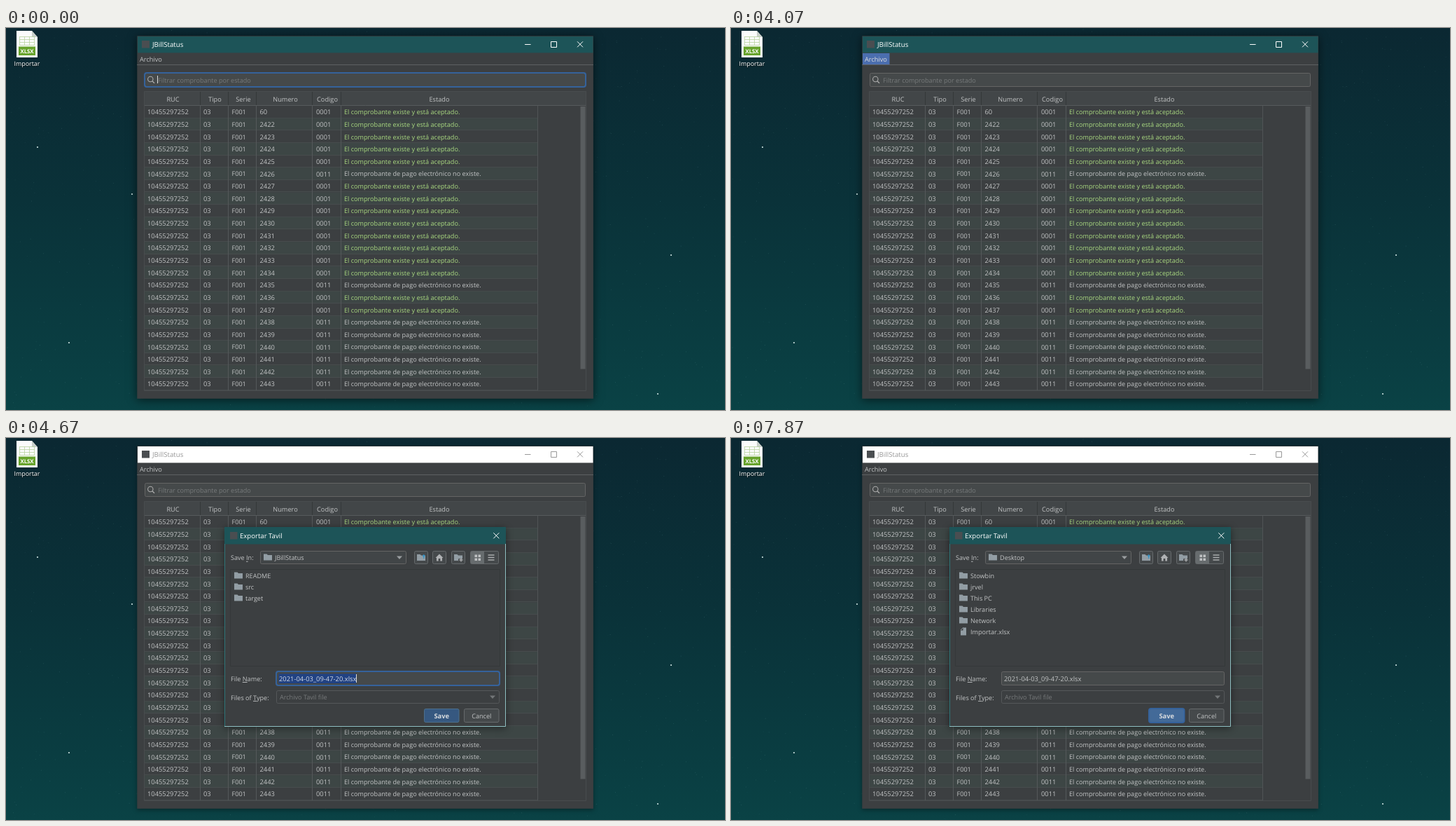
An HTML page with a canvas that plays this animation: 1027x545 px, repeating every 8000 ms.

```html
<!DOCTYPE html>
<html lang="es">
<head>
<meta charset="utf-8">
<title>JBillStatus</title>
<style>
  html, body { margin: 0; width: 100%; height: 100%; overflow: hidden; background: #0a3238; }
  canvas { display: block; width: 1027px; height: 545px; }
</style>
</head>
<body>
<canvas id="stage" width="1027" height="545"></canvas>
<script>
const W = 1027, H = 545, LOOP = 8000;
const stage = document.getElementById('stage').getContext('2d');
let ctx = stage;

const C = {
  panel: '#3c3f41', field: '#45494a', border: '#646464', text: '#c2c4c5', dim: '#777a7b',
  green: '#a9d980', teal: '#1d5458', ring: '#35629b', focus: '#4a7ab0', button: '#45494b',
  buttonEdge: '#666a6c', icon: '#929da4', menu: '#4b6eaf', appIcon: '#4a4e51', listEdge: '#343839'
};

// ---------- helpers ----------
function newLayer(paint) {
  const layer = document.createElement('canvas');
  layer.width = W;
  layer.height = H;
  const previous = ctx;
  ctx = layer.getContext('2d');
  paint();
  ctx = previous;
  return layer;
}

function rect(x, y, w, h, fill) {
  ctx.fillStyle = fill;
  ctx.fillRect(x, y, w, h);
}

function box(x, y, w, h, fill, stroke, r = 2, lineWidth = 1) {
  ctx.beginPath();
  ctx.roundRect(x + lineWidth / 2, y + lineWidth / 2, w - lineWidth, h - lineWidth, r);
  if (fill) { ctx.fillStyle = fill; ctx.fill(); }
  if (stroke) { ctx.strokeStyle = stroke; ctx.lineWidth = lineWidth; ctx.stroke(); }
}

function path(points, color, width = 1) {
  ctx.beginPath();
  points.forEach(([x, y], i) => i ? ctx.lineTo(x, y) : ctx.moveTo(x, y));
  ctx.strokeStyle = color;
  ctx.lineWidth = width;
  ctx.stroke();
}

function shape(points, fill) {
  ctx.beginPath();
  points.forEach(([x, y]) => ctx.lineTo(x, y));
  ctx.closePath();
  ctx.fillStyle = fill;
  ctx.fill();
}

function text(value, x, midY, color = C.text, size = 9.1, align = 'left', weight = 400) {
  ctx.font = `${weight} ${size}px "Open Sans", "Noto Sans", sans-serif`;
  ctx.textRendering = 'geometricPrecision';
  ctx.textAlign = align;
  ctx.fillStyle = color;
  ctx.fillText(value, x, midY + size * 0.36);
}

// Label with one underlined mnemonic letter.
function mnemonic(value, index, x, midY) {
  text(value, x, midY);
  const start = ctx.measureText(value.slice(0, index)).width;
  const width = ctx.measureText(value[index]).width;
  rect(x + start, midY + 4.6, width, 0.9, C.text);
}

function focusRing(x, y, w, h) {
  box(x - 1, y - 1, w + 2, h + 2, null, C.ring, 3, 2);
}

function cross(x, y, r, color) {
  path([[x - r, y - r], [x + r, y + r]], color);
  path([[x + r, y - r], [x - r, y + r]], color);
}

function arrow(x, y, color) {
  shape([[x - 4, y - 2], [x + 4, y - 2], [x, y + 2.5]], color);
}

function folder(x, y) {
  shape([[x, y - 5], [x + 4.5, y - 5], [x + 6, y - 3.5], [x + 12, y - 3.5],
         [x + 12, y + 4], [x, y + 4]], C.icon);
}

// ---------- desktop ----------
function paintDesktop() {
  const sky = ctx.createLinearGradient(0, 0, 0, H);
  sky.addColorStop(0, '#0b2832');
  sky.addColorStop(0.45, '#0a3239');
  sky.addColorStop(1, '#0a4245');
  rect(0, 0, W, H, sky);

  let seed = 7;
  const random = () => (seed = seed * 16807 % 2147483647) / 2147483647;
  for (let i = 0; i < 800; i++) {
    rect(random() * W, random() * H, 1, 1, `rgba(150,200,200,${0.04 + random() * 0.13})`);
  }
  for (const [x, y] of [[45, 170], [180, 237], [90, 449], [950, 324], [931, 522]]) {
    ctx.beginPath();
    ctx.arc(x, y, 1.1, 0, 7);
    ctx.fillStyle = '#cfe4e2';
    ctx.fill();
  }

  shape([[15, 4], [37, 4], [45, 13], [45, 42], [15, 42]], '#fbfbfb');
  shape([[37, 4], [45, 13], [37, 13]], '#c9cfc9');
  for (let i = 0; i < 4; i++) {
    path([[19, 12.5 + i * 4], [41, 12.5 + i * 4]], '#b9d3a0', 0.8);
    path([[19.5 + i * 7, 12.5], [19.5 + i * 7, 24.5]], '#b9d3a0', 0.8);
  }
  rect(18, 26.5, 24, 12.5, '#68a32c');
  text('XLSX', 30, 33, '#ffffff', 7.8, 'center', 700);
  ctx.shadowColor = '#000';
  ctx.shadowBlur = 2;
  ctx.shadowOffsetY = 1;
  text('Importar', 30, 51, '#ffffff', 8.9, 'center');
}

// ---------- main window ----------
const columnEdges = [277.5, 317.5, 357.5, 437.5, 478.5];
const headers = [['RUC', 238.5], ['Tipo', 298.5], ['Serie', 339], ['Numero', 399], ['Codigo', 459], ['Estado', 619]];
const ROWS = 23, ROW_H = 17.64, TOP = 111;

function paintTable() {
  rect(198, 90, 631, 21, '#424648');
  for (const [name, x] of headers) text(name, x, 101.6, C.text, 9.2, 'center');

  for (let i = 0; i < ROWS; i++) {
    const y = TOP + i * ROW_H, mid = y + 9;
    if (i % 2) rect(198, y, 561, ROW_H, '#3d4645');
    rect(198, Math.round(y + ROW_H) - 1, 561, 1, '#474c4d');
    const missing = i === 5 || i === 14 || i > 16;
    text('10455297252', 202, mid, C.text, 9.35);
    text('03', 282, mid, C.text, 9.35);
    text('F001', 322.5, mid);
    text(String(i ? 2421 + i : 60), 362.5, mid, C.text, 9.35);
    text(missing ? '0011' : '0001', 443, mid, C.text, 9.35);
    text(missing ? 'El comprobante de pago electrónico no existe.' : 'El comprobante existe y está aceptado.',
         483, mid, missing ? C.text : C.green);
  }

  for (const x of columnEdges) {
    path([[x, 90], [x, 110]], C.listEdge);
    path([[x, 111], [x, 517]], '#54585a');
  }
  path([[759.5, 111], [759.5, 517]], '#505456');
  path([[198, 110.5], [829, 110.5]], '#565a5c');
  box(197, 90, 632, 428, null, '#484c4e', 0);
  rect(820.5, 112, 7, 374.5, '#595d5f');
}

function paintWindow({ active, focused }) {
  ctx.save();
  ctx.shadowColor = active ? 'rgba(0,0,0,.55)' : 'rgba(0,0,0,.35)';
  ctx.shadowBlur = active ? 12 : 6;
  ctx.shadowOffsetY = 2;
  rect(187.3, 11.3, 651.6, 517.5, C.panel);
  ctx.restore();

  const ink = active ? '#ffffff' : '#999999';
  rect(188, 12, 650.5, 23.4, active ? C.teal : '#ffffff');
  rect(194, 18, 11, 10.5, C.appIcon);
  text('JBillStatus', 209, 23.6, ink, 9.7);
  path([[741, 23.5], [749.5, 23.5]], ink);
  box(778, 19, 9, 9, null, ink, 0);
  cross(820, 23.3, 4, ink);

  rect(187, 52, 652, 1, '#5d6062');
  box(198, 64, 630, 20, C.field, focused ? C.focus : C.border);
  if (focused) focusRing(198, 64, 630, 20);
  ctx.beginPath();
  ctx.arc(206.3, 73, 3.7, 0, 7);
  ctx.strokeStyle = '#adadad';
  ctx.lineWidth = 1.1;
  ctx.stroke();
  path([[209, 75.7], [212, 78.7]], '#adadad', 1.3);
  text('Filtrar comprobante por estado', 217, 74.6, C.dim);
  paintTable();
}

function paintMenu(highlight) {
  if (highlight) rect(188, 36, 38.5, 16, C.menu);
  text('Archivo', 191, 44.4, highlight ? '#dddddd' : C.text, 9.2);
}

function paintPopup(hovered) {
  box(188, 52, 110, 52, C.panel, '#5d6062', 0);
  ['Importar Tavil', 'Exportar Tavil', 'Salir'].forEach((item, i) => {
    const y = 53 + i * 16.7;
    if (i === hovered) rect(189, y, 108, 16.7, C.menu);
    text(item, 206, y + 8.4, i === hovered ? '#dddddd' : C.text);
  });
}

// ---------- save dialog ----------
function paintToolbar(home) {
  for (const x of [583, 609, 636]) {
    const own = x === 609 ? home : '';
    box(x, 161, 20, 19, own === 'pressed' ? '#5c6164' : C.button, own ? C.focus : C.buttonEdge);
    if (own) focusRing(x, 161, 20, 19);
  }
  folder(587, 171);
  shape([[594.5, 169], [596.8, 165.8], [599, 169]], '#3592c4');
  rect(596.1, 168.5, 1.4, 3.5, '#3592c4');
  shape([[613.5, 171], [619, 165.5], [624.5, 171], [623, 171], [623, 175.5], [620.3, 175.5],
         [620.3, 172], [617.7, 172], [617.7, 175.5], [615, 175.5], [615, 171]], '#afb1b3');
  folder(640, 171);
  path([[646, 174], [653, 174]], C.button, 3.4);
  path([[647.5, 174], [652.5, 174]], '#afb1b3', 1.4);
  path([[650, 171.5], [650, 176.5]], '#afb1b3', 1.4);

  box(663, 161, 41, 19, C.button, C.buttonEdge);
  rect(664, 162, 19, 17, '#676c6e');
  for (const x of [669.5, 674.5]) for (const y of [166.5, 171.5]) rect(x, y, 3.5, 3.5, '#c0c2c3');
  for (let i = 0; i < 3; i++) rect(688.5, 166.3 + i * 3.5, 9, 1.4, '#afb1b3');
}

function paintFiles(desktop) {
  const names = desktop
    ? ['Stowbin', 'jrvel', 'This PC', 'Libraries', 'Network', 'Importar.xlsx']
    : ['README', 'src', 'target'];
  names.forEach((name, i) => {
    const y = 196.4 + i * 16;
    if (name.includes('.')) {
      shape([[331.5, y - 6], [336, y - 6], [336, y + 5], [328, y + 5], [328, y - 2], [331.5, y - 2]], C.icon);
      path([[328, y - 2.3], [331.8, y - 6]], C.icon);
    } else folder(326, y);
    text(name, 342, y + 0.8);
  });
}

function paintDialog({ home, desktop, editing, caret, saveHot }) {
  ctx.save();
  ctx.shadowColor = 'rgba(0,0,0,.45)';
  ctx.shadowBlur = 10;
  ctx.shadowOffsetY = 2;
  rect(312, 127, 402, 285, C.panel);
  ctx.restore();
  rect(312, 127, 402, 24.5, C.teal);
  path([[312.5, 151], [312.5, 412]], '#2f7478');
  path([[312, 411.5], [713.5, 411.5], [713.5, 151]], '#8fc0c2');
  rect(320, 134, 10.5, 10.5, C.appIcon);
  text('Exportar Tavil', 334, 139.8, '#ffffff', 9.6);
  cross(700.3, 139.3, 4, '#ffffff');

  mnemonic('Save In:', 5, 321, 171.2);
  box(363, 161, 209, 19, '#414547', C.border);
  folder(368, 170.6);
  text(desktop ? 'Desktop' : 'JBillStatus', 384, 171.2);
  arrow(562, 170.5, '#9a9da0');
  paintToolbar(home);

  box(320, 187, 386, 139, null, C.listEdge, 0);
  paintFiles(desktop);

  mnemonic('File Name:', 5, 321, 343.4);
  box(386, 333, 319, 20, C.field, editing ? C.focus : C.border);
  if (editing) {
    focusRing(386, 333, 319, 20);
    rect(389.5, 336.5, 111, 13.5, '#214283');
  }
  text('2021-04-03_09-47-20.xlsx', 390, 343.4, editing ? '#d3d9e4' : C.text, 9.4);
  if (caret) rect(500, 337, 1, 12, '#dddddd');

  mnemonic('Files of Type:', 9, 321, 370.3);
  box(386, 360, 319, 19, C.panel, '#55585a');
  text('Archivo Tavil file', 391, 370.2, C.dim);
  arrow(695, 369.5, '#737678');

  box(597, 386, 50.5, 20, saveHot ? '#436a98' : '#365880', saveHot ? C.focus : '#4c708c');
  if (saveHot) focusRing(597, 386, 50.5, 20);
  text('Save', 622.3, 396.4, '#d8dbde', 9.4, 'center', 700);
  box(654, 386, 50.5, 20, C.button, C.buttonEdge);
  text('Cancel', 679.3, 396.4, C.text, 9.1, 'center');
}

// ---------- timeline ----------
const searchBlink = [200, 670, 1200, 1730, 2200, 2730];
const nameBlink = [5000, 5470, 6000];
const opening = [[0.1, 0.93], [0.3, 0.955], [0.6, 0.975], [0.84, 0.987], [0.95, 0.995]];

// A caret starts visible and flips at each listed time.
const blinkOn = (flips, t) => flips.filter(at => t >= at).length % 2 === 0;

const desktopLayer = newLayer(paintDesktop);
const windowLayers = {
  focused: newLayer(() => paintWindow({ active: true, focused: true })),
  active: newLayer(() => paintWindow({ active: true, focused: false })),
  inactive: newLayer(() => paintWindow({ active: false, focused: false }))
};
const freshDialog = newLayer(() => paintDialog({ home: '', desktop: false, editing: true, caret: true }));

function render(t) {
  const state = t < 2930 ? 'focused' : t < 4330 ? 'active' : 'inactive';
  ctx.drawImage(desktopLayer, 0, 0);
  ctx.drawImage(windowLayers[state], 0, 0);
  paintMenu(state === 'active');
  if (state === 'focused' && blinkOn(searchBlink, t)) rect(216, 68, 1, 11, '#dddddd');
  if (t >= 2930 && t < 4070) paintPopup(t < 3400 ? -1 : t < 3530 ? 0 : 1);
  if (t < 4330) return;

  if (t < 4665) {
    const [alpha, scale] = opening[Math.min(4, Math.floor((t - 4330) / 66.6))];
    ctx.save();
    ctx.globalAlpha = alpha;
    ctx.translate(513, 269.5);
    ctx.scale(scale, scale);
    ctx.drawImage(freshDialog, -513, -269.5);
    ctx.restore();
    return;
  }
  const editing = t < 6330;
  paintDialog({
    editing,
    caret: editing && blinkOn(nameBlink, t),
    home: editing || t >= 7870 ? '' : t < 6530 ? 'pressed' : 'focused',
    desktop: t >= 6530,
    saveHot: t >= 7870
  });
}

const start = performance.now();
function tick() {
  render((performance.now() - start) % LOOP);
  requestAnimationFrame(tick);
}
tick();
</script>
</body>
</html>
```
